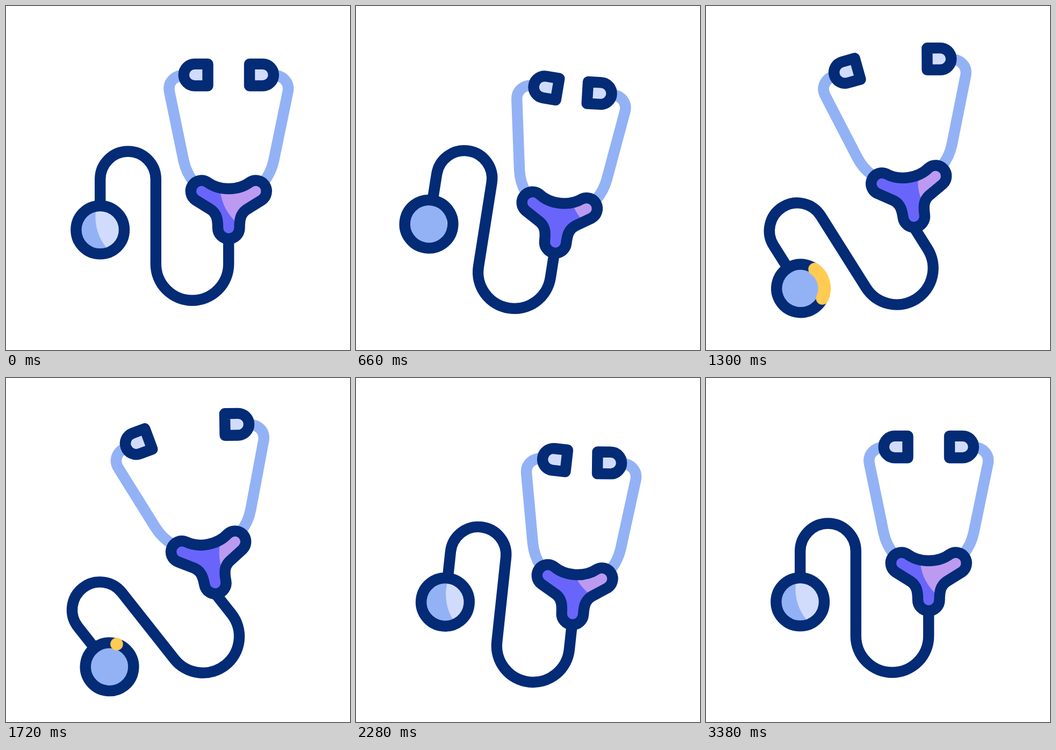
Animation, 640 px wide and 640 px high, one loop 3.6 s. Source, as an HTML page with a canvas:

```html
<!DOCTYPE html>
<html lang="en">
<head>
<meta charset="utf-8">
<title>Stethoscope</title>
<style>
  html, body { margin: 0; width: 100%; height: 100%; overflow: hidden; background: #fff; }
  canvas { display: block; width: 640px; height: 640px; }
</style>
</head>
<body>
<canvas id="stage" width="640" height="640"></canvas>
<script>
const ctx = document.getElementById('stage').getContext('2d');
const LOOP = 3600;
const LINE = 20.4;
const RAD = Math.PI / 180;
const NAVY = '#032b76', BLUE = '#93b2f5', PALE = '#d1dcfc';
const PURPLE = '#6a65fa', PINK = '#bc9af1', YELLOW = '#ffcb52';

const HUB = { x: 414.25, y: 344 };
const HOSE_PIVOT = { x: 414, y: 439 };
const ARM_PIVOT = { x: 350, y: 326 };
const CHEST = { x: 175.2, y: 416.5 };

const earPath = new Path2D('M375.5 107.9H351a20.3 20.3 0 0 0 0 40.6H375.5Z');
const tubePath = new Path2D('M334 128.5C312 128.5 300 143 304.3 161L330.5 288C334 304 340 316 349 327L353 331');
const hosePath = new Path2D('M175.2 375V322.3A51.8 51.8 0 0 1 278.8 322.3V480A67.7 67.7 0 0 0 414.2 480V425');
const hubPath = new Path2D('M374.5 327.6Q391 340 414.25 340Q437.5 340 454 327.6' +
  'A20 20 0 0 1 476 361L447 379C436 387 434.5 398 434.5 413' +
  'A20.2 20.2 0 0 1 394 413C394 398 392.5 387 381.5 379' +
  'L352.5 361A20 20 0 0 1 374.5 327.6Z');

// Offsets from rest; tilt turns everything, hose the tube, squeeze closes the arms.
const pose = (at, dx, dy, tilt, hose, squeeze) => ({ at, dx, dy, tilt, hose, squeeze });
const rest = at => pose(at, 0, 0, 0, 0, 0);
const lean = pose(380, -15.2, 19.5, 3.9, 6.7, 2.15);
const dip = pose(920, -47.5, 29.9, 7.7, 9.9, 3.5);
const launch = pose(1110, -37, -13, -5.8, -27, -6);
const lifted = pose(1800, -37.8, -30.8, -10.75, -38.5, -9.7);
const recoil = pose(2230, -8.5, 26.3, 3.7, 6.3, 3);
const settle = pose(2720, 0, 5.3, -0.85, -0.55, -1.1);
const overshoot = pose(2960, 0.2, -1.7, -0.7, -0.7, -0.7);
const poses = [rest(0), lean, dip, launch, lifted, recoil, settle, overshoot, rest(3380)];

// Smooth through each pose, stopping wherever a channel turns back.
function slopeAt(i, name) {
  const a = poses[i - 1], b = poses[i], c = poses[i + 1];
  if (!a || !c) return 0;
  const before = (b[name] - a[name]) / (b.at - a.at);
  const after = (c[name] - b[name]) / (c.at - b.at);
  return before * after <= 0 ? 0 : 2 * before * after / (before + after);
}

function poseAt(time) {
  const next = poses.findIndex(p => p.at > time);
  if (next < 0) return rest(time);
  const a = poses[next - 1], b = poses[next];
  const span = b.at - a.at, u = (time - a.at) / span;
  const ease = u * u * (3 - 2 * u);
  const result = {};
  for (const name in a) {
    const bend = slopeAt(next - 1, name) * (1 - u) - slopeAt(next, name) * u;
    result[name] = a[name] + (b[name] - a[name]) * ease + span * u * (1 - u) * bend;
  }
  return result;
}

function rotateAround({ x, y }, degrees) {
  ctx.translate(x, y);
  ctx.rotate(degrees * RAD);
  ctx.translate(-x, -y);
}

function stroke(path, color) {
  ctx.strokeStyle = color;
  ctx.stroke(path);
}

function circle(x, y, r) {
  const path = new Path2D();
  path.arc(x, y, r, 0, Math.PI * 2);
  return path;
}

function twoTone(path, base, light, x, y) {
  ctx.save();
  ctx.clip(path);
  ctx.fillStyle = base;
  ctx.fill(path);
  ctx.fillStyle = light;
  ctx.fill(circle(x, y, 90));
  ctx.restore();
}

function drawArm(angle, mirrored) {
  ctx.save();
  if (mirrored) {
    ctx.translate(2 * HUB.x, 0);
    ctx.scale(-1, 1);
  }
  rotateAround(ARM_PIVOT, angle);
  stroke(tubePath, BLUE);
  ctx.fillStyle = PALE;
  ctx.fill(earPath);
  stroke(earPath, NAVY);
  ctx.restore();
}

function drawPulse(time) {
  if (time < 925 || time > 1740) return;
  const progress = (start, length) => Math.min(1, Math.max(0, (time - start) / length));
  const head = Math.sin(progress(925, 525) * Math.PI / 2);
  const tail = (1 - Math.cos(progress(1080, 640) * Math.PI)) / 2;
  const angle = part => (90 - 124 * part) * RAD;
  ctx.save();
  ctx.lineCap = 'round';
  ctx.lineWidth = 23.5;
  ctx.strokeStyle = YELLOW;
  ctx.beginPath();
  ctx.arc(CHEST.x, CHEST.y, 44.3, angle(tail), angle(Math.max(head, tail + 0.001)), true);
  ctx.stroke();
  ctx.restore();
}

function drawHose(angle, dx, time) {
  const { x, y } = CHEST;
  ctx.save();
  rotateAround(HOSE_PIVOT, angle);
  stroke(hosePath, NAVY);
  twoTone(circle(x, y, 44), BLUE, PALE, x + 81.2 - 1.12 * dx, y - 24);
  stroke(circle(x, y, 44.8), NAVY);
  drawPulse(time);
  ctx.restore();
}

function draw(time) {
  const { dx, dy, tilt, hose, squeeze } = poseAt(time);
  ctx.fillStyle = '#fff';
  ctx.fillRect(0, 0, 640, 640);
  ctx.lineWidth = LINE;
  ctx.lineJoin = 'round';
  ctx.save();
  ctx.translate(dx, dy);
  rotateAround(HUB, tilt);
  drawArm(squeeze, false);
  drawArm(squeeze, true);
  drawHose(hose - tilt, dx, time);
  // The highlights lag behind the body's movement.
  twoTone(hubPath, PURPLE, PINK, HUB.x + 74 - 0.85 * dx, HUB.y - 9 - 1.35 * dy);
  stroke(hubPath, NAVY);
  ctx.restore();
}

const began = performance.now();
function tick() {
  draw((performance.now() - began) % LOOP);
  requestAnimationFrame(tick);
}
tick();
</script>
</body>
</html>
```
